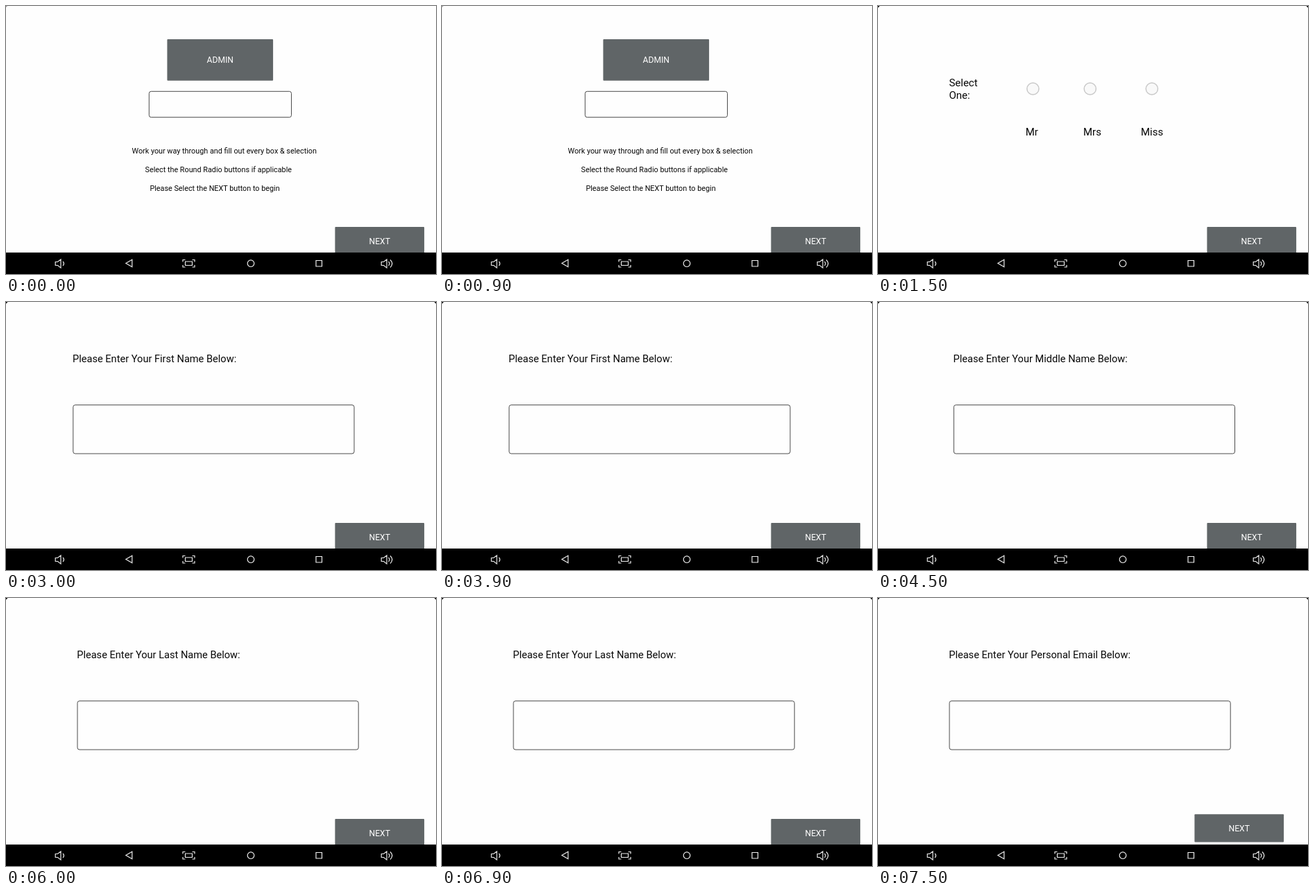
An HTML page for the animation above (8000 ms loop, 620 by 387 pixels).

```html
<!DOCTYPE html>
<html lang="en">
<head>
<meta charset="utf-8">
<title>Registration form</title>
<style>
  html, body { margin: 0; width: 100%; height: 100%; overflow: hidden; background: #fefefe; }
  svg { display: block; width: 620px; height: 387px; }
  text { font-family: Roboto, sans-serif; fill: #080808; }
  .button { fill: #606567; }
  .label { fill: #fff; font-size: 12.1px; text-anchor: middle; }
  .field { fill: #fefefe; stroke: #4c4c4c; }
  .radio { fill: #f9f9f9; stroke: #c9c9c9; stroke-width: 1.5; }
  .icons { fill: none; stroke: #ececec; stroke-width: 1.2; }
</style>
</head>
<body>
<svg viewBox="0 0 620 387">
  <rect width="620" height="387" fill="#fefefe"/>
  <g id="page"></g>
  <rect y="356" width="620" height="31" fill="#000"/>
  <g class="icons">
    <path d="M71.2 369.5h3.3l4.5-3.6v12.2l-4.5-3.6h-3.3zM82 369q3 3 0 6"/>
    <path d="M172.8 371.5l9-5.2v10.4z"/>
    <path d="M255 369.5v-3h3.5M268.500 366.500h3.500v3M272 374v3h-3.500M258.500 377h-3.500v-3M258.500 369h10v5.500h-10z"/>
    <circle cx="353" cy="371.700" r="4.800"/>
    <path d="M447 367.500h8.500v8.500h-8.500z"/>
    <path d="M541.200 369.500h3.300l4.500-3.600v12.200l-4.500-3.600h-3.300zM551.500 369q2.800 3 0 6M554 366.500q5.500 5.500 0 11"/>
  </g>
</svg>
<script>
const text = (x, y, size, words) =>
  `<text x="${x}" y="${y}" font-size="${size}">${words}</text>`;

const button = (x, y, width, height, label) =>
  `<rect class="button" x="${x}" y="${y}" width="${width}" height="${height}" rx="1"/>
   <text class="label" x="${x + width / 2}" y="${y + height / 2 + 4.4}">${label}</text>`;

const field = (x, y, width, height) =>
  `<rect class="field" x="${x}" y="${y}" width="${width}" height="${height}" rx="3"/>`;

const next = (x = 474.4, y = 319) => button(x, y, 128.7, 40.3, "NEXT");

const corners = '<path d="M0 0h2.500l-2.500 2.500zM620 0v2.500l-2.500-2.500z"/>';

const option = (circleX, labelX, label) =>
  `<circle class="radio" cx="${circleX}" cy="119.5" r="8.6"/>` + text(labelX, 186.5, 15, label);

const question = (x, subject, nextButton = next()) =>
  corners + text(x - 0.8, 86.6, 14.6, `Please Enter Your ${subject} Below:`) +
  field(x, 148.7, 405.2, 70.3) + nextButton;

const welcome =
  '<path d="M0 0h2l-2 2z" fill="#999"/>' +
  button(232.4, 48, 152.7, 59.7, "ADMIN") +
  field(206.3, 123.3, 205.2, 37.4) +
  text(181.5, 213, 10.8, "Work your way through and fill out every box &amp; selection") +
  text(200.6, 240, 10.8, "Select the Round Radio buttons if applicable") +
  text(207.4, 267, 10.8, "Please Select the NEXT button to begin") +
  next();

const title =
  corners + text(102.4, 116.4, 15, "Select") + text(102.4, 134, 15, "One:") +
  option(223.4, 212.7, "Mr") + option(305.8, 296, "Mrs") + option(394.9, 379, "Miss") +
  next();

const pages = [
  welcome,
  title,
  question(96.8, "First Name"),
  question(109.3, "Middle Name"),
  question(103, "Last Name"),
  question(103, "Personal Email", next(456.4, 312.3)),
];

const pageTime = 1500, loopTime = 8000;
const pageElement = document.getElementById("page");
let shown = -1;

function draw() {
  const index = Math.floor(performance.now() % loopTime / pageTime);
  if (index !== shown) pageElement.innerHTML = pages[shown = index];
  requestAnimationFrame(draw);
}
draw();
</script>
</body>
</html>
```
